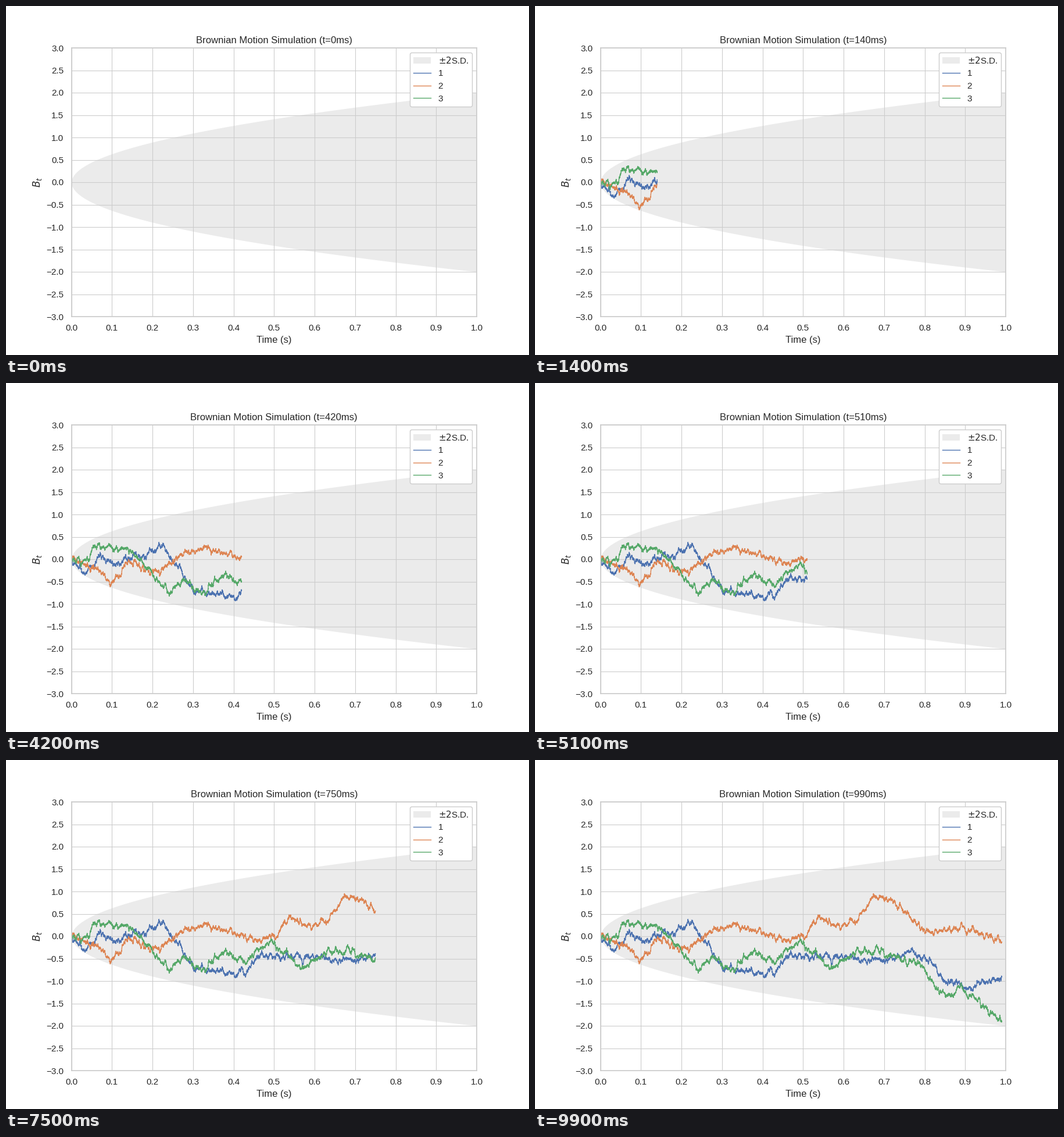
A matplotlib script for the animation above (10000 ms loop, 900 by 600 pixels).

```python
import numpy as np
import matplotlib.pyplot as plt
from matplotlib.animation import FuncAnimation

FRAMES, STEPS, PINS = 100, 10000, 80

plt.rcParams.update({
    "font.family": "Liberation Sans",
    "text.color": "0.15", "axes.labelcolor": "0.15",
    "xtick.color": "0.15", "ytick.color": "0.15",
    "axes.edgecolor": "0.8", "axes.linewidth": 1.25,
    "axes.grid": True, "axes.axisbelow": True,
    "grid.color": "0.8", "grid.linewidth": 0.8,
    "axes.titlesize": 12, "axes.labelsize": 12,
    "xtick.labelsize": 11, "ytick.labelsize": 11, "legend.fontsize": 11,
    "xtick.bottom": False, "ytick.left": False,
    "xtick.major.size": 6, "ytick.major.size": 6,
})

# Colour and main turning points (time, value) of each walk
WALKS = {
    "#4C72B0": [(0, 0), (.035, -.35), (.07, .08), (.1, -.1), (.17, .04),
                (.226, .32), (.3, -.72), (.43, -.85), (.46, -.45),
                (.72, -.53), (.757, -.36), (.813, -.48), (.845, -.97),
                (.9, -1.16), (1, -.94)],
    "#DD8452": [(0, 0), (.07, -.25), (.096, -.55), (.14, -.06), (.215, -.3),
                (.257, .03), (.335, .3), (.45, -.13), (.51, .06), (.537, .47),
                (.57, .24), (.63, .3), (.675, .88), (.725, .8), (.8, .1),
                (.89, .18), (1, -.14)],
    "#55A868": [(0, 0), (.027, -.12), (.058, .28), (.145, .24), (.24, -.74),
                (.27, -.48), (.325, -.73), (.378, -.4), (.43, -.55),
                (.494, -.13), (.569, -.7), (.645, -.3), (.785, -.54),
                (.835, -1.25), (.87, -1.35), (.885, -1.12), (1, -1.96)],
}

t = np.linspace(0, 1, STEPS + 1)
rng = np.random.default_rng(7)


def walk(points):
    """Brownian bridges laid over the line through the points."""
    noise = np.r_[0, rng.normal(0, STEPS ** -0.5, STEPS).cumsum()]
    pins = slice(None, None, STEPS // PINS)
    noise -= np.interp(t, t[pins], noise[pins])
    return np.interp(t, *zip(*points)) + noise


fig, ax = plt.subplots(figsize=(9, 6), dpi=100)
fig.patch.set_facecolor("white")
ax.set(xlim=(0, 1), ylim=(-3, 3), xlabel="Time (s)", ylabel="$B_t$",
       xticks=np.linspace(0, 1, 11), yticks=np.linspace(-3, 3, 13))
ax.fill_between(t, -2 * np.sqrt(t), 2 * np.sqrt(t), color="black", alpha=0.08,
                lw=0, zorder=0, label=r"$\pm 2$S.D.")
title = ax.set_title("")

paths = [walk(points) for points in WALKS.values()]
lines = [ax.plot([], [], color=color, lw=1, label=str(i))[0]
         for i, color in enumerate(WALKS, 1)]
ax.legend(loc="upper right", framealpha=1)


def update(frame):
    n = frame * STEPS // FRAMES + 1
    for line, path in zip(lines, paths):
        line.set_data(t[:n], path[:n])
    title.set_text(f"Brownian Motion Simulation (t={frame * 10}ms)")
    return [*lines, title]


anim = FuncAnimation(fig, update, frames=FRAMES, interval=100,
                     repeat=True, repeat_delay=0)
plt.show()
```
